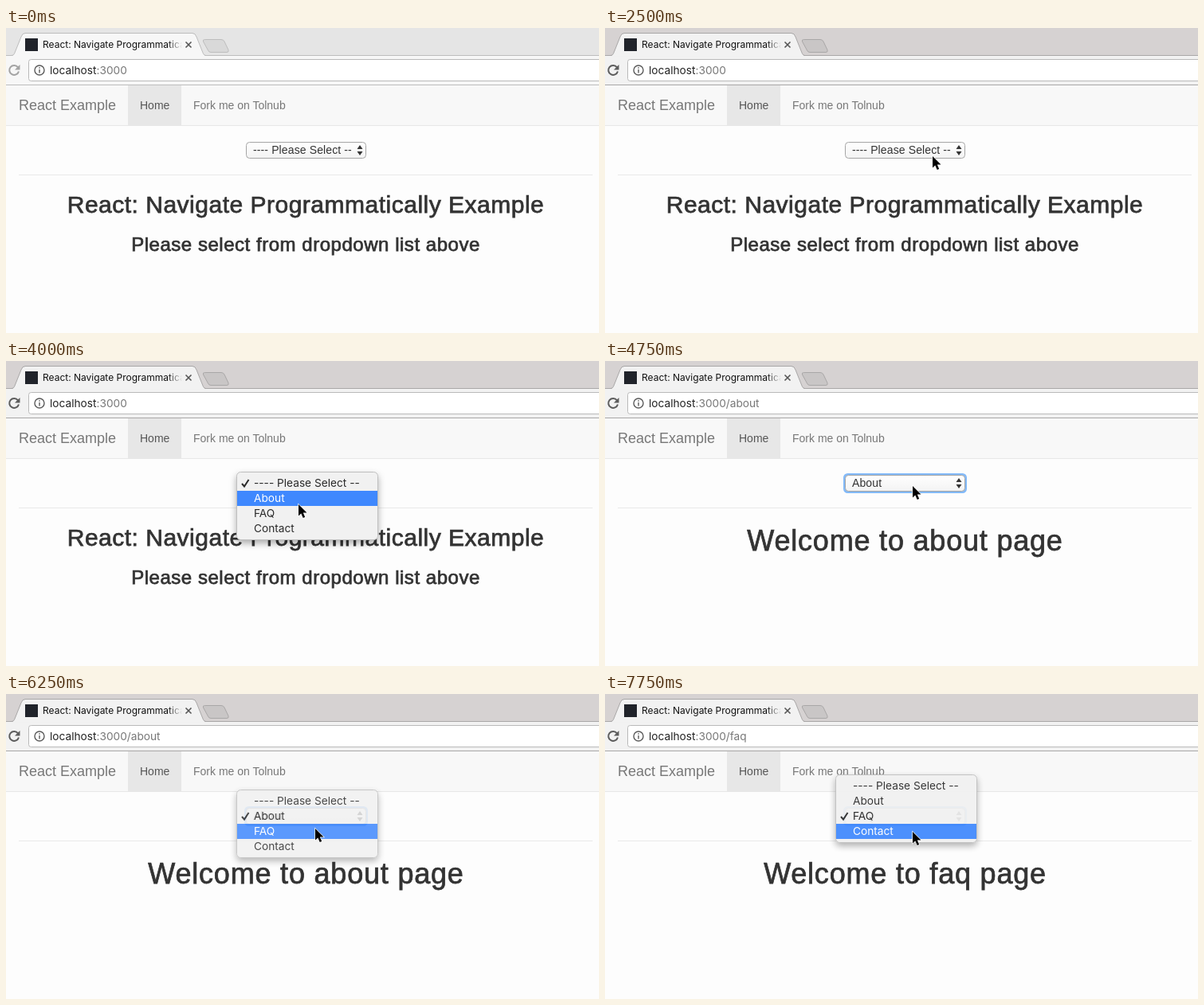
Write an HTML page that moves like this. It is 744 px wide and 383 px high and loops after 8000 ms.

```html
<!DOCTYPE html>
<html lang="en">
<head>
<meta charset="utf-8">
<title>Navigate Programmatically</title>
<style>
  html, body { margin: 0; width: 100%; height: 100%; overflow: hidden; background: #fdfdfd; }
  svg { display: block; width: 744px; height: 383px; }
  text { white-space: pre; }
  .ui { font-family: Inter, Roboto, sans-serif; font-size: 13.7px; }
  .page { font-family: "Liberation Sans", Arial, sans-serif; font-size: 14px; }
  .title { fill: #333; stroke: #333; stroke-width: .75px; text-anchor: middle; }
  .h1 { font-size: 36px; letter-spacing: .8px; }
  .h2 { font-size: 30px; letter-spacing: .5px; }
  .h3 { font-size: 24px; letter-spacing: .53px; }

  svg { --strip: #e5e5e5; --bar: #f7f7f7; --edge: #bdbdbd; --icon: #a3a3a3; --plus: #d9d9d9; }
  svg.active { --strip: #d6d2d2; --bar: #f2f2f2; --edge: #a9a7a7; --icon: #5c5c5c; --plus: #c9c6c6; }
  .strip { fill: var(--strip); }
  .bar { fill: var(--bar); }
  .edge { fill: none; stroke: var(--edge); }
  .plus { fill: var(--plus); stroke: var(--edge); }
  .reload { fill: none; stroke: var(--icon); stroke-width: 2; }
  .reload-tip { fill: var(--icon); }

  #field { fill: url(#button); stroke: #a5a5a5; }
  #ring { fill: none; stroke: #6eaef8; stroke-width: 3; opacity: .85; }
  #panel { fill: #f1f1f1; stroke: #bfbfbf; filter: url(#shadow); }
  #highlight { fill: #3f88fe; }
</style>
</head>
<body>
<svg id="stage" viewBox="0 0 744 383">
  <defs>
    <linearGradient id="button" x2="0" y2="1">
      <stop stop-color="#fff"/><stop offset="1" stop-color="#f3f3f3"/>
    </linearGradient>
    <linearGradient id="fade" gradientUnits="userSpaceOnUse" x1="203" x2="221">
      <stop stop-color="#fff"/><stop offset="1" stop-color="#000"/>
    </linearGradient>
    <mask id="tabFade"><rect x="40" y="8" width="181" height="24" fill="url(#fade)"/></mask>
    <filter id="shadow" x="-20%" y="-20%" width="140%" height="150%">
      <feDropShadow dx="0" dy="4" stdDeviation="4.5" flood-opacity=".32"/>
    </filter>
  </defs>

  <!-- browser window -->
  <rect class="strip" width="744" height="35"/>
  <rect class="bar" y="34" width="744" height="38"/>
  <path class="edge" d="M0 34.5H744"/>
  <path class="bar" d="M7 35.5C10 34 10 33 11 31L19 11Q20.500 7 24 7H234Q237.500 7 239 11L247 31C248 33 248 34 251 35.500Z"/>
  <path class="edge" d="M7 34.500C10 34 10 33 11 31L19 11Q20.500 6.500 24 6.500H234Q237.500 6.500 239 11L247 31C248 33 248 34 251 34.500"/>
  <path class="plus" d="M249.500 14.500H270Q273 14.500 274 17L279 27.500Q280 30.500 277 30.500H257Q254.500 30.500 253.500 28L247.500 17Q246.500 14.500 249.500 14.500Z"/>
  <rect x="24" y="13" width="16" height="16" fill="#20232a"/>
  <g mask="url(#tabFade)">
    <text class="ui" x="46" y="25" style="font-size:12px" fill="#111">React: Navigate Programmatically</text>
  </g>
  <path d="M225.500 17.500L232.500 24.500M232.500 17.500L225.500 24.500" stroke="#555" stroke-width="1.600"/>
  <path class="reload" d="M15 49.300A6 6 0 1 0 16 54.500"/>
  <path class="reload-tip" d="M17.500 46V52.500H11Z"/>
  <rect x="28.500" y="39.500" width="730" height="27" rx="3" fill="#fff" stroke="#b9b9b9"/>
  <g fill="none" stroke="#5a5a5a" stroke-width="1.400">
    <circle cx="42" cy="53" r="6"/>
    <path d="M42 52V56.500M42 49.200V50.800"/>
  </g>
  <text class="ui" x="55" y="58" fill="#222">localhost<tspan id="path" fill="#777"></tspan></text>
  <path class="edge" d="M0 71.500H744"/>

  <!-- page -->
  <rect y="72" width="744" height="50" fill="#f8f8f8"/>
  <rect x="153" y="72" width="67" height="50" fill="#e7e7e7"/>
  <path d="M0 122.500H744" stroke="#e7e7e7"/>
  <g class="page">
    <text x="16" y="103" fill="#777" style="font-size:18px">React Example</text>
    <text x="168" y="102" fill="#555">Home</text>
    <text x="235" y="102" fill="#777">Fork me on Tolnub</text>
  </g>
  <path d="M16 184.500H736" stroke="#eaeaea"/>
  <g class="page title" id="home">
    <text class="h2" x="376" y="232">React: Navigate Programmatically Example</text>
    <text class="h3" x="376" y="280">Please select from dropdown list above</text>
  </g>
  <text class="page title h1" id="welcome" x="376.500" y="238"></text>

  <!-- select -->
  <rect id="ring" x="300.500" y="142.500" width="152" height="22" rx="4"/>
  <rect id="field" x="301.500" y="143.500" width="150" height="20" rx="4"/>
  <text class="page" id="value" x="310" y="158" fill="#333" letter-spacing=".12"></text>
  <path d="M440.500 152L444 147L447.500 152ZM440.500 155L444 160L447.500 155Z" fill="#333"/>

  <g id="menu">
    <rect id="panel" x="289.500" y="-4.500" width="177" height="85" rx="5"/>
    <rect id="highlight" x="290" width="176" height="19"/>
    <g id="items" class="ui"></g>
    <path id="check" d="M296 10L299 13.500L304.500 5" fill="none" stroke-width="2"/>
  </g>

  <path id="cursor" d="M0 0V14.500L3.300 11.400L5.700 17L8.200 16L5.800 10.500H10.500Z" fill="#000" stroke="#fff" stroke-width="1.300" paint-order="stroke"/>
</svg>

<script>
const LOOP = 8000, ROW = 19, FIELD_TOP = 144;
const options = ["---- Please Select --", "About", "FAQ", "Contact"];
const $ = id => document.getElementById(id);

// Each step lists only what changes. menu: opacity, hover: lit row (-1 for none).
const steps = [
  [0,    { active: false, at: null, page: "", path: "", picked: 0, focus: false, menu: 0, hover: 0 }],
  [1000, { at: [120, 265] }],
  [1250, { at: [160, 227] }],
  [1500, { at: [411, 161] }],
  [2500, { active: true }],
  [3000, { at: [380, 156] }],
  [3250, { at: [379, 157] }],
  [3500, { menu: 1, hover: 0, focus: true }],
  [4000, { hover: 1, at: [367, 180] }],
  [4250, { hover: -1 }],
  [4500, { hover: 1, menu: .85 }],
  [4750, { menu: 0, picked: 1, page: "about", path: "/about", at: [386, 157] }],
  [5000, { at: [388, 155] }],
  [5250, { menu: 1, hover: 1 }],
  [5500, { at: [388, 163] }],
  [5750, { hover: 2, at: [388, 169] }],
  [6250, { menu: .85 }],
  [6500, { menu: 0, picked: 2, path: "/faq" }],
  [6750, { page: "faq", at: [393, 155] }],
  [7000, { menu: 1, hover: 2 }],
  [7250, { hover: 3, at: [386, 173] }],
  [7750, { menu: .93 }]
];

const rows = options.map((label, i) => {
  const row = document.createElementNS("http://www.w3.org/2000/svg", "text");
  row.setAttribute("x", 311);
  row.setAttribute("y", i * ROW + 14);
  row.textContent = label;
  return $("items").appendChild(row);
});

const show = (id, on) => { $(id).style.display = on ? "" : "none"; };
const move = (id, x, y) => $(id).setAttribute("transform", `translate(${x} ${y})`);
const ink = lit => lit ? "#fff" : "#2b2b2b";

function render(s) {
  $("stage").classList.toggle("active", s.active);
  $("path").textContent = ":3000" + s.path;
  show("home", !s.page);
  $("welcome").textContent = s.page && `Welcome to ${s.page} page`;
  $("value").textContent = options[s.picked];
  show("ring", s.focus);

  show("menu", s.menu > 0);
  $("menu").style.opacity = s.menu;
  move("menu", 0, FIELD_TOP - s.picked * ROW);
  show("highlight", s.hover >= 0);
  move("highlight", 0, Math.max(s.hover, 0) * ROW);
  rows.forEach((row, i) => row.setAttribute("fill", ink(i === s.hover)));
  move("check", 0, s.picked * ROW);
  $("check").setAttribute("stroke", ink(s.picked === s.hover));

  show("cursor", s.at);
  if (s.at) move("cursor", ...s.at);
}

const start = performance.now();
let shown = 0;

function tick() {
  const time = (performance.now() - start) % LOOP;
  const past = steps.filter(([from]) => from <= time);
  if (past.length !== shown) {
    shown = past.length;
    render(Object.assign({}, ...past.map(([, change]) => change)));
  }
  requestAnimationFrame(tick);
}
tick();
</script>
</body>
</html>
```
